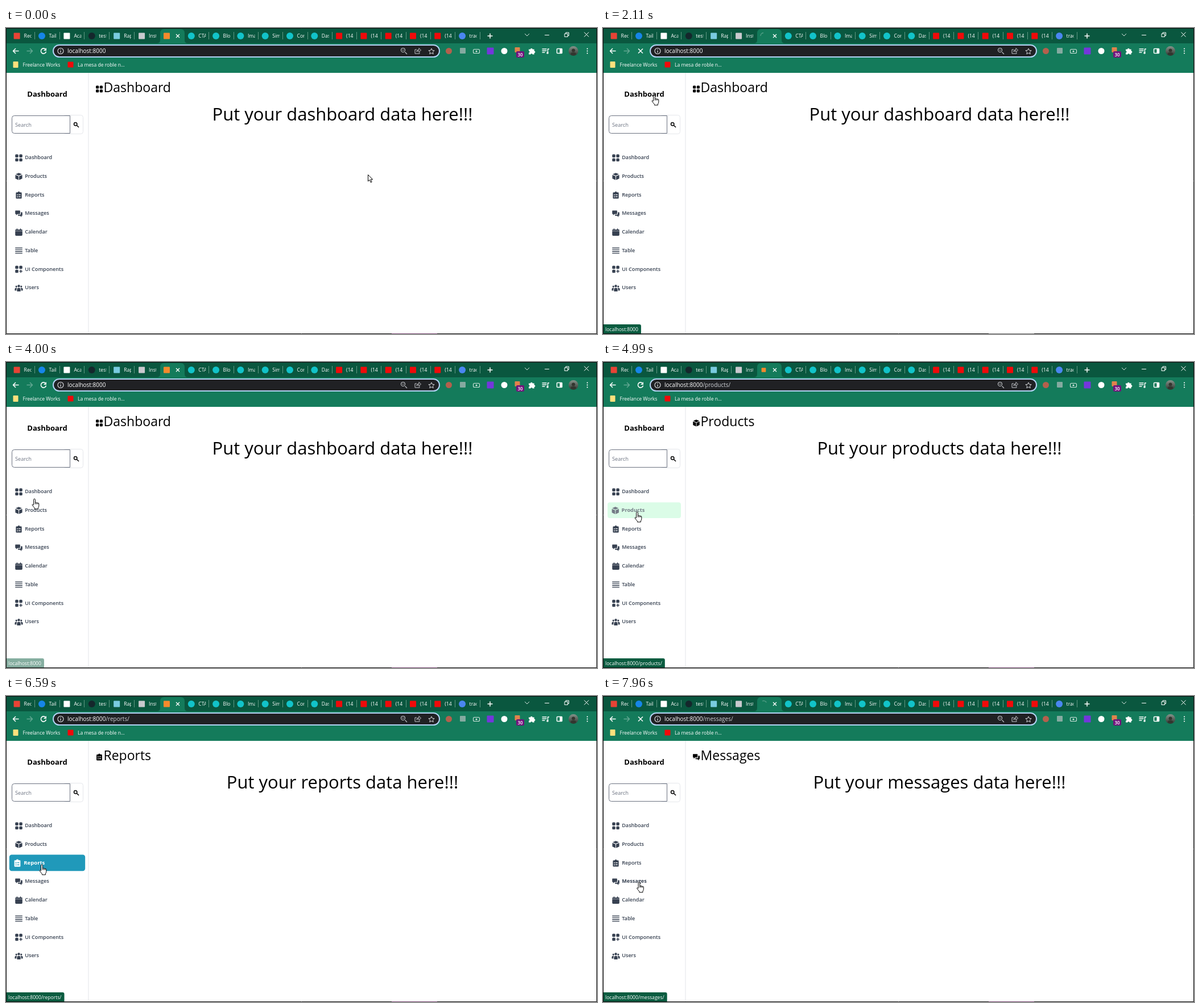
Write an HTML page with a canvas that moves like this. It is 1039 by 539 pixels and loops after 8000 ms.

```html
<!DOCTYPE html>
<html lang="en">
<head>
<meta charset="utf-8">
<title>Dashboard</title>
<style>
html, body { margin: 0; width: 100%; height: 100%; overflow: hidden; background: #fff; }
canvas { display: block; }
</style>
</head>
<body>
<canvas id="stage" width="1039" height="539"></canvas>
<script>
const ctx = document.getElementById('stage').getContext('2d');
const LOOP = 8000, FONT = '"Open Sans", "Noto Sans", sans-serif';
const STRIP = '#0a573f', BAR = '#147b5b', INK = [55, 65, 81];

const clamp = v => Math.max(0, Math.min(1, v));
const mix = (a, b, k) => a.map((v, i) => v + (b[i] - v) * k);
const rgb = (c, alpha = 1) => `rgba(${c.map(Math.round)},${alpha})`;

// Piecewise motion through [time, ...values] keys, eased inside each piece.
function along(keys, t) {
  const next = keys.findIndex(k => k[0] > t);
  if (next < 0) return keys[keys.length - 1].slice(1);
  if (next === 0) return keys[0].slice(1);
  const a = keys[next - 1], b = keys[next];
  const k = (t - a[0]) / (b[0] - a[0]);
  return mix(a.slice(1), b.slice(1), k * k * (3 - 2 * k));
}

function text(str, x, y, size, color, weight = 400, align = 'left') {
  ctx.font = `${weight} ${size}px ${FONT}`;
  ctx.textAlign = align;
  ctx.fillStyle = color;
  ctx.fillText(str, x, y);
  return ctx.measureText(str).width;
}
function box(x, y, w, h, r, fill, stroke, line = 1) {
  ctx.beginPath();
  ctx.roundRect(x, y, w, h, r);
  if (fill) { ctx.fillStyle = fill; ctx.fill(); }
  if (stroke) { ctx.strokeStyle = stroke; ctx.lineWidth = line; ctx.stroke(); }
}
const dot = (x, y, r, fill, stroke, line) => box(x - r, y - r, 2 * r, 2 * r, r, fill, stroke, line);
const square = (x, y, s, fill) => box(x - s / 2, y - s / 2, s, s, 1, fill);

function shape(d, x, y, { scale = 1, fill, stroke, line = 1.3 }) {
  const path = new Path2D(d);
  ctx.save();
  ctx.translate(x, y);
  ctx.scale(scale, scale);
  if (fill) { ctx.fillStyle = fill; ctx.fill(path, 'evenodd'); }
  if (stroke) { ctx.strokeStyle = stroke; ctx.lineWidth = line; ctx.lineJoin = 'round'; ctx.stroke(path); }
  ctx.restore();
}
const line = (d, x, y, stroke = '#fff', width = 1.3) => shape(d, x, y, { stroke, line: width });

// Menu icons, each in a 16 unit box.
const tile = (x, y) => `M${x} ${y + 2}q0-2 2-2h3q2 0 2 2v3q0 2-2 2h-3q-2 0-2-2z`;
const head = (x, y, r) => `M${x - r} ${y}a${r} ${r} 0 1 1 ${2 * r} 0a${r} ${r} 0 1 1 ${-2 * r} 0z`;
const tiles = tile(0, 0) + tile(9, 0) + tile(0, 9);
const ICONS = [
  tiles + tile(9, 9),
  'M8 0l7 3-7 3.2-7-3.2zM.3 4.4l7.1 3v8.6l-7.1-3.2zM15.7 4.4l-7.1 3v8.6l7.1-3.2z',
  'M3 2h2.5a2.5 2 0 0 1 5 0h2.5q1.5 0 1.5 1.5v11q0 1.5-1.5 1.5h-10q-1.5 0-1.5-1.5v-11q0-1.5 1.5-1.5zM4 6.5h2v2h-2zM7.5 6.5h4.5v1.6h-4.5zM4 11h2v2h-2zM7.5 11h4.5v1.6h-4.5z',
  'M1 1h9q1 0 1 1v6q0 1-1 1h-5l-3 3v-3h-1q-1 0-1-1v-6q0-1 1-1zM12.5 5h2.5q1 0 1 1v6q0 1-1 1h-1v3l-3-3h-4q-1 0-1-1v-1.5h4.5q2 0 2-2z',
  'M0 3.5q0-1.5 1.5-1.5h1.5v-2h2.2v2h5.6v-2h2.2v2h1.5q1.5 0 1.5 1.5v1.5h-16zM0 5.8h16v8.2q0 2-2 2h-12q-2 0-2-2z',
  [1, 5, 9, 13].map(y => `M0 ${y}h16v1.7h-16z`).join(''),
  tiles + 'M11.6 9h2v2.5h2.5v2h-2.5v2.5h-2v-2.5h-2.5v-2h2.5z',
  head(8, 4, 2.8) + head(2.5, 5, 2) + head(13.5, 5, 2) +
    'M4 16v-4q0-4 4-4t4 4v4zM-1 14v-3q0-3 3-3h2q-1.5 2-1.5 6zM17 14v-3q0-3-3-3h-2q1.5 2 1.5 6z'
];
const icon = (i, cx, cy, size, fill) =>
  shape(ICONS[i], cx - size / 2, cy - size / 2, { scale: size / 16, fill });

const MENU = ['Dashboard', 'Products', 'Reports', 'Messages', 'Calendar', 'Table', 'UI Components', 'Users'];
const pathOf = i => 'localhost:8000' + (i ? `/${MENU[i].toLowerCase()}/` : '');

// Timeline
const POINTER = [
  [0, 636, 258], [69, 636, 258], [70, 636, 252], [680, 636, 252], [1000, 270, 190], [1230, 25, 124],
  [1350, 30, 122], [1520, 30, 122], [1700, 90, 118], [2450, 90, 118], [2850, 50, 230], [3100, 50, 241],
  [4030, 50, 241], [4260, 60, 264], [5490, 60, 264], [5760, 63, 297], [7030, 63, 297], [7300, 63.5, 328]
];
const BUBBLE = [[1550, 0], [1650, 1], [3150, 1], [3220, .8], [3290, 1], [3860, 1], [4000, .5], [4060, .4], [4110, 1]];
const LOADS = [[1750, 2380], [3300, 3800], [4520, 4930], [6250, 6390], [7500, 8200]];
const HOVERS = [ // row, start, end, fade-out time
  [0, 2850, 3750, 1], [1, 4090, 4900, 1], [1, 4900, 5570, 200], [2, 5600, 6290, 1],
  [2, 6290, 7120, 200], [3, 7170, 7945, 1], [3, 7960, 9000, 1]
];
const since = (times, t) => times.filter(s => t >= s).length;
const pageAt = t => since([4900, 6290, 7945], t);
const linkAt = t => since([4090, 5600, 7170], t);
const hoverOf = (row, t) => Math.max(0, ...HOVERS.filter(h => h[0] === row && t >= h[1])
  .map(([, start, end, fade]) => clamp((t - start) / 300) * (1 - clamp((t - end) / fade))));

const TEAL = '#12c3c9', RED = '#f00a0a';
const TABS = [
  ['Rec', '#e84335', 1], ['Tail', '#1685e8'], ['Aca', '#fff', 1], ['test', '#15272c'], ['Rap', '#79cbe0', 1],
  ['Inst', '#c9c9ce', 1], null, ['CTA', TEAL], ['Blo', TEAL], ['Ima', TEAL], ['Sim', TEAL], ['Con', TEAL],
  ['Das', TEAL], ...Array(5).fill(['(14', RED, 1]), ['trad', '#4a86f0']
];

function drawTabs(t) {
  box(0, 0, 1039, 28, 0, STRIP);
  shape('M265 27q6 0 6-6V9q0-7 7-7h29q7 0 7 7v12q0 6 6 6z', 0, 0, { fill: BAR });
  TABS.forEach((tab, i) => {
    if (!tab) return;
    const x = 282.5 + (i - 6) * (i < 6 ? 43.9 : 43.3);
    if (tab[2]) square(x, 14, 11, tab[1]); else dot(x, 14, 6, tab[1]);
    ctx.save();
    ctx.beginPath();
    ctx.rect(x + 12, 5, 13.5, 18);
    ctx.clip();
    text(tab[0], x + 12.5, 17, 8.6, '#fff');
    ctx.restore();
    if (i !== 5) box(Math.round(x + 30.5), 7, 1, 13, 0, '#5f9983');
  });

  const load = LOADS.filter(l => t >= l[0]).pop();
  const loading = load && t < load[1];
  if (loading) {
    const a = Math.PI - (t - 2110) / 160;
    ctx.beginPath();
    ctx.arc(282.5, 14, 5.5, a, a + 1.5);
    ctx.strokeStyle = '#56a088';
    ctx.lineWidth = 1.3;
    ctx.stroke();
  } else {
    square(282.5, 14, 11 * (load ? .5 + .5 * clamp((t - load[1]) / 150) : 1), '#f58a2c');
  }
  line('M-3-3l6 6M3-3l-6 6', 302, 14);
  line('M-4.5 0h9M0-4.5v9', 851, 14, '#fff', 1.5);
  line('M-4-2l4 4 4-4', 916, 12, '#d5e5df', 1);
  line('M-4 0h8', 951, 12.5, '#fff', 1);
  line('M-3.5-1.5h5.5v5.5h-5.5zM-1.5-1.5v-2h5.5v5.5h-2', 985.5, 11.5, '#fff', 1);
  line('M-4-4l8 8M4-4l-8 8', 1020.5, 11.5, '#fff', 1);
  return loading;
}

function drawToolbar(url, loading) {
  box(0, 27, 1039, 52, 0, BAR);
  line('M5 0h-10M-.5-4.5l-4.5 4.5 4.5 4.5', 17.5, 40.5, '#fff', 1.5);
  line('M-5 0h10M.5-4.5l4.5 4.5-4.5 4.5', 41.5, 40.5, '#62a892', 1.5);
  if (loading) {
    line('M-4-4l8 8M4-4l-8 8', 66, 40.5, '#fff', 1.5);
  } else {
    line('M3.5-3a4.6 4.6 0 1 0 1 4', 66, 40.5, '#fff', 1.6);
    shape('M5-5.5v5h-5z', 66, 40.5, { fill: '#fff' });
  }
  box(83, 30, 679, 21, 10.5, '#202124', '#b3d4f5', 2);
  dot(96, 40.5, 5, null, '#e8eaed', 1.1);
  line('M0-3v1.3M0-.5v3.5', 96, 40.5, '#e8eaed', 1.2);
  const hostWidth = text('localhost:8000', 108, 44, 10, '#fff');
  text(url.slice(14), 108 + hostWidth, 44, 10, '#cfd2d6');
  line('M2 2l3.5 3.5M-5-1.5a3.5 3.5 0 1 0 7 0a3.5 3.5 0 1 0-7 0M-3-1.5h3', 699.5, 40.5, '#c4c7cb', 1.1);
  line('M-2-2h-3v7h8v-2M-2 2q0-4 4-4v-2.5l3.5 3.5-3.5 3.5v-2.5q-2.5 0-4 2z', 724, 40, '#c4c7cb', 1);
  line('M0-5l1.5 3.3 3.6.4-2.7 2.5.8 3.6-3.2-1.8-3.2 1.8.8-3.6-2.7-2.5 3.6-.4z', 748, 41, '#d5d8db', 1);

  dot(778.5, 40.5, 5.5, '#b4604d');
  square(803, 40, 10, '#84aaa0');
  box(821.5, 37.5, 11, 7, 2, null, '#d3e5de', 1.1);
  dot(827, 41, 1.5, '#d3e5de');
  square(851.5, 40.5, 12, '#7436dc');
  dot(876, 40.5, 5.5, '#fff');
  square(899, 38.5, 9, '#e1834c');
  box(897, 41, 14, 11, 2, '#71147c');
  text('30', 904, 49.5, 8, '#fff', 600, 'center');
  shape('M-5-3h3a1.8 1.8 0 1 1 3.6 0h3v3a1.8 1.8 0 1 1 0 3.6v2.4h-3a1.6 1.6 0 0 0-3.2 0h-3.4v-3a1.6 1.6 0 0 0 0-3.2z', 924, 40.5, { fill: '#fff' });
  line('M-6-4h8M-6-1h8M-6 2h5M4 3v-7h2.5', 948.5, 41, '#fff', 1.4);
  dot(952, 44, 1.8, '#fff');
  box(968.5, 36.5, 9, 8, 1, null, '#fff', 1.5);
  box(973.5, 36, 4.5, 9, 0, '#fff');
  const photo = ctx.createLinearGradient(0, 32, 0, 49);
  photo.addColorStop(0, '#87938b');
  photo.addColorStop(1, '#2d3530');
  dot(997.5, 40.5, 8.5, photo);
  dot(997.5, 39.5, 3, '#33362f');
  box(993, 43, 9, 5, 3, '#33362f');
  for (const y of [36.5, 40.5, 44.5]) dot(1022, y, 1.1, '#fff');

  box(12.5, 59, 9, 11, 1, '#ffe07c');
  text('Freelance Works', 29.5, 68, 8.6, '#fff');
  square(113.5, 64.5, 10, RED);
  text('La mesa de roble n...', 126, 68, 8.6, '#fff');
}

function drawSidebar(t) {
  box(144.5, 79, 1, 460, 0, '#e3e5e9');
  text('Dashboard', 72.5, 121, 13, '#000', 700, 'center');
  box(100.5, 153.5, 35, 33, 4, '#fff', '#e5e7eb');
  box(10.5, 154.5, 102, 31, [4, 0, 0, 4], '#fff', '#6b7280');
  text('Search', 16, 174, 9.2, '#6b7280');
  line('M1 1l3.5 3.5M-4-1.2a2.7 2.7 0 1 0 5.4 0a2.7 2.7 0 1 0-5.4 0', 123.5, 170.5, '#000', 1.5);

  const push = hoverOf(0, t) * 1.3;
  MENU.forEach((name, i) => {
    const p = hoverOf(i, t), first = i === 0;
    const cy = 228.5 + 32.7 * i, grow = first ? 1 : 1 + .05 * p;
    const mint = [220, 252, 231];
    const color = rgb(mix(INK, [255, 255, 255], p));
    ctx.save();
    ctx.translate(72.5, cy);
    ctx.scale(grow, grow);
    if (p > 0) {
      const h = first ? 29 : 27.4;
      const fill = p < .3 ? rgb(mint, p / .3) : rgb(mix(mint, [32, 153, 186], (p - .3) / .7));
      box(-63.5, -h / 2, 127, h, 4, fill);
    }
    const dy = first && p ? 0 : push;
    icon(i, -50, dy + .3, 12.6, color);
    text(name, -39.3, dy + (first && p ? 4 : 2.8), first ? 9.1 + .9 * p : 9.1, color, p > 0 ? 700 : 600);
    ctx.restore();
  });
}

function drawPage(page) {
  icon(page, 164, 107.5, 12, '#000');
  text(MENU[page], 171.5, 113, 23, '#000');
  text(`Put your ${MENU[page].toLowerCase()} data here!!!`, 591.5, 163, 31, '#000', 400, 'center');
}

function drawBubble(t) {
  const [alpha] = along(BUBBLE, t);
  if (!alpha) return;
  const label = pathOf(linkAt(t));
  ctx.font = `400 8.6px ${FONT}`;
  box(0, 522, ctx.measureText(label).width + 9, 17, [0, 3, 0, 0], `rgba(10,92,64,${alpha})`);
  text(label, 4, 534, 8.6, '#fff');
}

function drawPointer(t) {
  const [x, y] = along(POINTER, t);
  const arrow = t < 1600 || (t > 2520 && t < 2830);
  if (arrow) {
    shape('M.5.5v11.5l2.7-2.5 2 4.5 1.9-.8-2-4.4h3.6z', x, y, { fill: '#fff', stroke: '#000', line: 1 });
  } else {
    shape('M3.2 10V2q0-1.4 1.4-1.4T6 2v5.2q1.2-1 2.2.3 1.2-.8 2.2.4 2-.4 2 1.4v3.5q0 2-1.4 3.6v2h-6v-1.6Q2 13.5.6 11q.4-1.9 2.6.2zM6 7v3M8.2 7.5v2.5M10.4 8v2',
      x - 4.6, y - .5, { fill: '#fff', stroke: '#000', line: 1 });
  }
}

function draw(t) {
  const page = pageAt(t);
  ctx.fillStyle = '#fff';
  ctx.fillRect(0, 0, 1039, 539);
  const loading = drawTabs(t);
  drawToolbar(pathOf(page), loading);
  drawSidebar(t);
  drawPage(page);
  drawBubble(t);
  box(.5, .5, 1038, 538, 0, null, '#0a0a0a');
  box(678, 538, 80, 1, 0, t > 1350 && t < 3990 ? '#6d6d6d' : '#70406a');
  drawPointer(t);
}

function frame() {
  draw(performance.now() % LOOP);
  requestAnimationFrame(frame);
}
frame();
</script>
</body>
</html>
```
